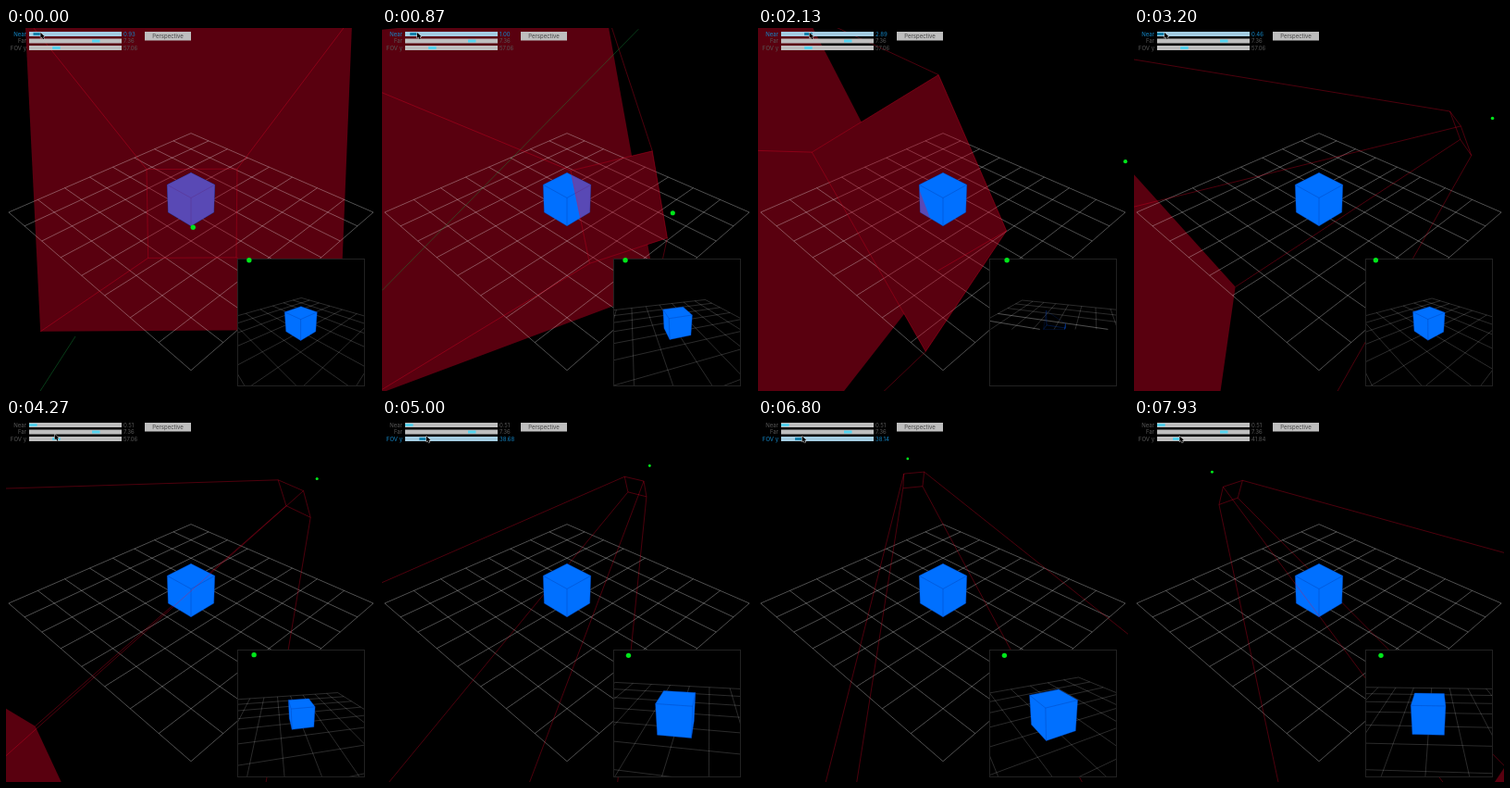
Write an HTML page with a canvas that moves like this. It is 400 px wide and 392 px high and loops after 8 s.

```html
<!DOCTYPE html>
<html>
<head>
<meta charset="utf-8">
<style>
html, body { margin: 0; width: 100%; height: 100%; overflow: hidden; background: #000; }
canvas { display: block; }
</style>
</head>
<body>
<canvas id="stage" width="400" height="392"></canvas>
<script>
const ctx = document.getElementById('stage').getContext('2d');
const LOOP = 8000, STEP = 200 / 3;
const FAR = 7.36, WORLD_SCALE = 2;
const INSET = { x: 250, y: 249, size: 137.5 };
const RED_FILL = 'rgba(255,0,45,0.35)', RED_LINE = 'rgba(255,0,45,0.3)';
const BLUE = '#0070ff', BLUE_EDGE = 'rgba(0,60,170,0.2)';

const add = (a, b, k = 1) => a.map((v, i) => v + b[i] * k);
const dot = (a, b) => a.reduce((sum, v, i) => sum + v * b[i], 0);
const cross = (a, b) => a.map((_, i) => {
  const j = (i + 1) % 3, k = (i + 2) % 3;
  return a[j] * b[k] - a[k] * b[j];
});
const unit = a => a.map(v => v / Math.hypot(...a));
const mix = (a, b, k) => a.map((v, i) => v + (b[i] - v) * k);
const halfTan = degrees => Math.tan(degrees * Math.PI / 360);
const ramp = (t, from, to) => Math.min(1, Math.max(0, (t - from) / (to - from)));

// Slider values and the cursor that drags them.
const nearAt = t => .93 + .07 * ramp(t, 0, 870) + 1.9 * ramp(t, 1130, 2130)
  - 2.44 * ramp(t, 2130, 3200) + .05 * ramp(t, 3200, 3530);
const fovAt = t => 57.06 - 33.7 * ramp(t, 4400, 5500) + 18.48 * ramp(t, 6000, 7000);
const cursorAt = (t, near, fov) =>
  mix([28.7 + 9.3 * near, 5], [30.5 + .45 * fov, 18.5], ramp(t, 3530, 4400));

// Keeps the part of a polygon (or segment) where side(p) >= 0.
function clip(points, side) {
  const kept = [];
  points.forEach((a, i) => {
    const b = points[(i + 1) % points.length], da = side(a), db = side(b);
    if (da >= 0) kept.push(a);
    if (da * db < 0) kept.push(mix(a, b, da / (da - db)));
  });
  return kept;
}

function makeCamera(pos, target, focal, cx, cy, near) {
  const forward = unit(add(target, pos, -1));
  const right = unit(cross(forward, [0, 1, 0]));
  const up = cross(right, forward);
  const depth = p => dot(add(p, pos, -1), forward);
  const project = p => {
    const d = add(p, pos, -1), k = focal / dot(d, forward);
    return [cx + dot(d, right) * k, cy - dot(d, up) * k];
  };
  const trace = points => {
    clip(points, p => depth(p) - near).forEach((p, i) => {
      const [x, y] = project(p);
      i ? ctx.lineTo(x, y) : ctx.moveTo(x, y);
    });
    if (points.length > 2) ctx.closePath();
  };
  return { pos, forward, right, up, depth, project, trace };
}

function paint(camera, shapes, fill, stroke) {
  ctx.beginPath();
  shapes.forEach(camera.trace);
  if (fill) { ctx.fillStyle = fill; ctx.fill(); }
  if (stroke) { ctx.strokeStyle = stroke; ctx.lineWidth = 1; ctx.stroke(); }
}

const GRID = [];
for (let i = -4; i <= 4; i++) GRID.push([[i, 0, -4], [i, 0, 4]], [[-4, 0, i], [4, 0, i]]);

const SQUARE = [[-1, 1], [1, 1], [1, -1], [-1, -1]];
const CENTER = [0, .5, 0];
const FACES = [0, 1, 2].flatMap(axis => [-.5, .5].map(side => {
  const place = (a, b) => {
    const p = [0, 0, 0];
    p[axis] = side; p[(axis + 1) % 3] = a; p[(axis + 2) % 3] = b;
    return p;
  };
  return { normal: place(0, 0), points: SQUARE.map(([a, b]) => add(place(a / 2, b / 2), CENTER)) };
}));
const visibleFaces = camera => FACES
  .filter(f => dot(add(camera.pos, f.points[0], -1), f.normal) > 0).map(f => f.points);

function drawCube(camera) {
  const faces = visibleFaces(camera);
  paint(camera, FACES.map(f => f.points), null, BLUE_EDGE);
  paint(camera, faces, BLUE);
  paint(camera, faces, null, BLUE_EDGE);
}

const mainCamera = makeCamera([8, 8, 8], [0, 0, 0], 200 / halfTan(45), 200, 199, .1);

function orbitCamera(t, near, fov) {
  const angle = .008 + t * .0005;
  const u = 4.79 * Math.sin(angle), w = 4.79 * Math.cos(angle) - .065;
  const pos = [(w + u) * Math.SQRT1_2, 3, (w - u) * Math.SQRT1_2];
  const half = INSET.size / 2;
  return makeCamera(pos, CENTER, half / halfTan(fov), INSET.x + half, INSET.y + half, near);
}

function drawMain(eye, near, fov, t) {
  const slice = distance => SQUARE.map(([x, y]) => {
    const h = distance * halfTan(fov);
    return add(add(add(eye.pos, eye.forward, distance), eye.right, x * h), eye.up, y * h);
  });
  const nearQuad = slice(near), farQuad = slice(FAR * WORLD_SCALE), middle = slice(5.4);

  // The near plane is filled only when seen from the eye's side.
  const beyondNear = p => dot(add(p, nearQuad[0], -1), eye.forward);
  const nearFill = beyondNear(mainCamera.pos) < 0 ? [nearQuad] : [];

  // The near plane hides the far one, so their tints never add up.
  ctx.save();
  ctx.beginPath();
  ctx.rect(0, 0, 400, 392);
  nearFill.forEach(mainCamera.trace);
  ctx.clip('evenodd');
  paint(mainCamera, [farQuad], RED_FILL);
  ctx.restore();
  paint(mainCamera, GRID, null, 'rgba(255,255,255,0.31)');
  paint(mainCamera, nearFill, RED_FILL);

  const lines = nearQuad.flatMap((p, i) => {
    const next = nearQuad[(i + 1) % 4];
    return [
      { points: [p, farQuad[i]], probe: middle[i] },
      { points: [p, next], probe: mix(p, next, .5) }
    ];
  });
  const inFront = l => mainCamera.depth(l.probe) < mainCamera.depth(CENTER);
  const drawLines = list => list.forEach(l => paint(mainCamera, [l.points], null, RED_LINE));

  drawLines(lines.filter(l => !inFront(l)));
  drawSweep(t);
  drawCube(mainCamera);

  // Tint the part of the cube that lies behind the near plane.
  ctx.save();
  ctx.beginPath();
  nearFill.forEach(mainCamera.trace);
  ctx.clip();
  paint(mainCamera, visibleFaces(mainCamera).map(f => clip(f, beyondNear)), RED_FILL);
  ctx.restore();
  drawLines(lines.filter(inFront));

  const [x, y] = mainCamera.project(eye.pos);
  drawDot(x, y, 22 / mainCamera.depth(eye.pos));
}

function drawDot(x, y, radius) {
  ctx.fillStyle = '#00e61a';
  ctx.beginPath();
  ctx.arc(x, y, radius, 0, 7);
  ctx.fill();
}

// Dark green line sweeping past the main camera at the start.
function drawSweep(t) {
  if (t > 1000) return;
  const [x1, y1, x2, y2] = mix([75, 333, 37, 392], [278, 0, 0, 283], ramp(t, 0, 870));
  ctx.strokeStyle = 'rgba(20,150,60,0.4)';
  ctx.beginPath();
  ctx.moveTo(x1, y1);
  ctx.lineTo(x2, y2);
  ctx.stroke();
}

function drawInset(eye, cursor) {
  const { x, y, size } = INSET;
  ctx.save();
  ctx.fillStyle = '#000';
  ctx.fillRect(x, y, size, size);
  ctx.beginPath();
  ctx.rect(x, y, size, size);
  ctx.clip();
  paint(eye, GRID, null, 'rgba(255,255,255,0.17)');
  drawCube(eye);
  ctx.restore();
  ctx.strokeStyle = '#222';
  ctx.strokeRect(x + .5, y + .5, 137, 137);
  drawDot(x + cursor[0] * size / 400, y + cursor[1] * size / 400, 2.7);
}

function text(value, x, y, align, color) {
  ctx.font = '6px Inter, sans-serif';
  ctx.textAlign = align;
  ctx.textBaseline = 'middle';
  ctx.fillStyle = color;
  ctx.fillText(value, x, y);
}

function drawSlider(label, value, offset, y, active) {
  const color = active ? '#1488c8' : '#585858';
  text(label, 22, y + 2.8, 'right', color);
  ctx.fillStyle = active ? '#a4cde2' : '#bebebe';
  ctx.fillRect(25, y, 100, 5);
  ctx.fillStyle = active ? '#1682ac' : '#54d2ee';
  ctx.fillRect(25 + offset, y + 1, 8.5, 3);
  text(value.toFixed(2), 127, y + 2.8, 'left', color);
}

function drawCursor(x, y) {
  ctx.beginPath();
  [[0, 0], [0, 6], [1.5, 4.8], [2.6, 7.2], [3.8, 6.7], [2.8, 4.4], [4.6, 4.3]]
    .forEach(([dx, dy]) => ctx.lineTo(x + dx, y + dy));
  ctx.closePath();
  ctx.lineWidth = 1;
  ctx.strokeStyle = '#ddd';
  ctx.stroke();
  ctx.fillStyle = '#000';
  ctx.fill();
}

function drawControls(near, fov, cursor, t) {
  drawSlider('Near', near, Math.max(0, (near - .5) * 10.5), 4, t < 3530);
  drawSlider('Far', FAR, 68, 11.5, false);
  drawSlider('FOV y', fov, (fov - 10) / 170 * 91, 19, t > 4400 && t < 7300);
  ctx.fillStyle = '#bebebe';
  ctx.fillRect(150, 4, 50, 9.5);
  text('Perspective', 175, 9, 'center', '#444');
  drawCursor(...cursor);
}

function frame(now) {
  const t = Math.floor((now % LOOP + 5) / STEP) * STEP;
  const near = nearAt(t), fov = fovAt(t), cursor = cursorAt(t, near, fov);
  const eye = orbitCamera(t, near * WORLD_SCALE, fov);
  ctx.fillStyle = '#000';
  ctx.fillRect(0, 0, 400, 392);
  drawMain(eye, near * WORLD_SCALE, fov, t);
  drawInset(eye, cursor);
  drawControls(near, fov, cursor, t);
}

const start = performance.now();
function tick() {
  frame(performance.now() - start);
  requestAnimationFrame(tick);
}
tick();
</script>
</body>
</html>
```
